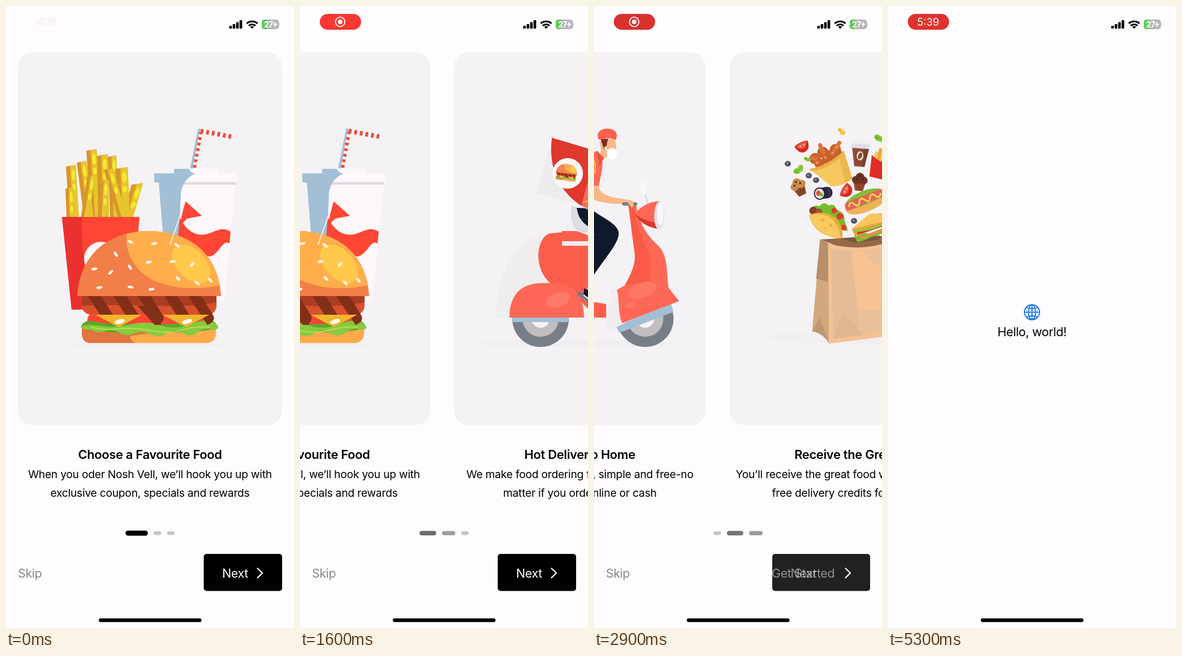
These frames come from a looping animation (509x1100 px, 5400 ms). An HTML page:

```html
<!DOCTYPE html>
<html lang="en">
<head>
<meta charset="utf-8">
<title>Food onboarding</title>
<style>
  html, body { margin: 0; width: 100%; height: 100%; overflow: hidden; background: #fefcff; }
  svg { display: block; width: 100vw; height: 100vh; }
  text { font-family: Inter, "Noto Sans", sans-serif; }
  .title { font-size: 21.8px; font-weight: 600; letter-spacing: -.28px; }
  .body { font-size: 19.2px; letter-spacing: -.23px; }
  .label { font-size: 21.5px; letter-spacing: -.4px; }
  .mid { text-anchor: middle; }
</style>
</head>
<body>
<svg id="stage" viewBox="0 0 509 1100"></svg>
<script>
const W = 509, LOOP = 5400;

// Drawing helpers: filled path, ellipse, stroked line, text
const P = (fill, d, more = '') => `<path fill="${fill}" d="${d}" ${more}/>`;
const E = (fill, x, y, rx, ry = rx, a = 0) =>
  `<ellipse fill="${fill}" rx="${rx}" ry="${ry}" transform="translate(${x} ${y}) rotate(${a})"/>`;
const L = (color, w, d, more = '') => P('none', d, `stroke="${color}" stroke-width="${w}" ${more}`);
const G = (move, body) => `<g transform="${move}">${body}</g>`;
const T = (cls, x, y, s, more = '') => `<text class="${cls}" x="${x}" y="${y}" ${more}>${s}</text>`;

function burger() {
  const bun = 'M126 513C130 440 180 398 253 398S376 440 380 513Z';
  const seeds = [[220,417,30],[262,420,-10],[302,423,40],[194,439,55],[252,453,-10],[219,462,55],
    [294,452,-5],[329,457,-50],[156,465,-8],[185,471,-45],[165,498,-8],[220,497,10],[257,501,-8],
    [304,482,45],[338,490,40],[361,485,50]];
  const stripes = [145, 190, 280].map(x => P('#822f18', `M${x} 513h23l21 33h-23z`)).join('') +
    [233, 322].map(x => P('#822f18', `M${x} 513h23l20 32 q8 12-9 19z`)).join('');
  const cheese = x => P('#f0b62d', `M${x} 546h82l-41 22z`) + E('#fff', x + 43, 558, 9, 4, -15);
  return `<clipPath id="bun"><path d="${bun}"/></clipPath>` +
    P('#e1743f', 'M134 565H371V580Q369 596 352 596H148Q135 595 134 580Z') +
    P('#ffaa4a', 'M219 584Q250 578 371 570V580Q369 596 352 596H229Q221 593 219 584Z') +
    P('#ff4634', 'M150 543H355Q365 546 364 563H144Q142 550 150 543Z') +
    P('#5ba82c', 'M132 568Q136 556 152 557Q190 566 230 561Q290 566 354 556Q370 553 375 570Q330 580 260 576Q180 582 132 568Z') +
    P('#87ca3b', 'M132 566Q150 562 170 566T220 563T275 565T330 562T375 566Q374 575 362 572Q350 568 339 577Q325 588 311 578Q295 568 282 580Q268 588 252 579Q238 573 224 580Q211 586 198 576Q185 570 174 575Q160 580 150 572Q134 574 132 566Z') +
    L('#b5e05a', 2, 'M150 568Q175 574 200 571T255 574T311 573T360 568') +
    P('#d9502c', 'M134 513H372V532Q370 544 358 546H150Q135 544 134 530Z') +
    P('#aa3c21', 'M134 513H372V524Q320 534 250 529Q180 528 134 530Z') + stripes +
    cheese(158) + cheese(277) +
    P('#822f18', 'M232 530l20 0 14 20 9 14-12 0z') +
    P('#f27f48', bun) +
    `<g clip-path="url(#bun)">` +
    P('#ffae4b', 'M214 398C208 430 224 468 262 486C300 502 345 503 390 491V390Z') +
    E('#ffca4b', 327, 456, 41, 25, 46) + '</g>' +
    seeds.map(s => E('#fff6ee', s[0], s[1], 5.5, 2.4, s[2])).join('');
}

// One potato stick from its top edge down to the carton rim
function fry(x, y, w, foot, bottom = 375) {
  const h = bottom - y, m = w * .42, k = (foot - x) / h;
  const drop = (d, ry) => E('#f4ea2b', x + m + w * .28 + k * d, y + d, w * .19, ry, -k * 57);
  return P('#d9952a', `M${x} ${y}l${w}-3L${foot + w} ${bottom}H${foot}Z`) +
    P('#e7c52f', `M${x + m} ${y - 1}l${w - m}-2L${foot + w} ${bottom}H${foot + m}Z`) +
    drop(15, 10) + drop(36, 6);
}

function mealArt() {
  const fries = [[142,256,18,150],[161,265,19,163],[180,267,15,184],[125,277,17,138],[106,284,17,112],
    [105,323,14,107],[222,316,20,204],[193,288,22,197],[173,290,16,198],[144,301,14,132],[166,310,16,162]];
  return E('#f0eef1', 250, 599, 138, 4) +
    fries.map(f => fry(...f)).join('') +
    P('#ff4634', 'M99 373H236L222 537H116Z') +
    P('#ea312f', 'M99 373H135Q133 420 139 460L134 537H116Z') +
    E('#fff8fb', 168, 447, 30, 30) +
    // cup
    P('#fdf7fb', 'M300 318L330 288H375V296H409V311H406L386 522H300Z') +
    P('#dcdcdf', 'M315 311.5H407L406 316H312Z') +
    P('#a2bfd6', 'M262 296H297V288H323Q326 296 335 296Q313 306 309 330L306 410H278L270 312H262Z') +
    P('#ff4634', 'M307 374C318 396 333 407 352 404C368 401 380 388 397 399L395 420C382 412 377 440 360 443C340 440 320 425 304 410Z') +
    P('#ff4634', 'M317 345L346 371 320 376 306 390Z') +
    L('#a2bfd6', 5, 'M328 287L342 217') +
    L('#fff', 6, 'M333 286L345 221') + L('#f04a38', 6, 'M333 286L345 221', 'stroke-dasharray="5 5"') +
    L('#fff', 8, 'M344 221L398 231') + L('#f04a38', 8, 'M344 221L398 231', 'stroke-dasharray="5 5"') +
    `<g id="burger">${burger()}</g>` +
    L('#fff', 1.6, 'M290 422L317 345');
}

function scooterArt() {
  const red = '#ff6856', grey = '#777e88';
  const wheel = x => E(grey, x, 553, 50) + E('#c2bec0', x, 553, 32) + E('#f5f3f5', x, 553, 16);
  return E('#f0eef1', 250, 597, 185, 6) +
    wheel(174) + wheel(381) +
    P('#f4f2f5', 'M119 495H230V551H119ZM325 500H435V528L330 569Z') +
    P('#f0edef', 'M95 551C95 490 120 410 188 403L250 420V551Z') +
    P('#fb5f4b', 'M170 442C171 420 178 407 190 402L215 400 288 424C270 440 264 455 265 480L276 521 312 527V551H273L228 505C190 500 171 475 170 442Z') +
    P('#fb5f4b', 'M212 398H238L288 416H212Z') + P('#f1eeef', 'M212 416H307V424H212Z') +
    P('#a2bfd6', 'M124 550H224L223 559H125Z') +
    P(red, 'M119 551C119 512 138 491 175 490H203C235 493 250 515 251 551Z') + E('#ff7a69', 205, 520, 22, 12, -18) +
    // front body
    P('#a2bfd6', 'M329 566L427 527 431 541 335 578Z') +
    P('#f1edef', 'M332 500C316 522 309 550 314 575L345 561V500Z') +
    P(red, 'M331 502L345 494C358 470 365 455 362 435L351 350H365C368 380 383 405 404 424C421 440 419 470 422 498L441 522 340 561C332 540 336 520 331 502Z') +
    P('#f95b48', 'M351 350H361C362 390 385 425 391 447Q393 470 387 487L345 494C358 470 365 455 362 435Z') +
    E('#ff7866', 376, 503, 26, 13, -20) + E('#ff7866', 354, 529, 9, 5, -15) +
    P('#e03a2c', 'M363 367Q378 358 402 347V394Q372 388 363 367Z') +
    P(red, 'M363 367Q378 348 404 345L404 383Q380 382 363 367Z') +
    E('#e4e1e8', 406, 370, 9, 25, 2) + E('#f8f6fa', 408, 367, 6, 20, 2) +
    L('#b3b3b8', 1, 'M386 350L380 330') + E('#faf7fb', 377.5, 323, 5.5, 13) +
    // rider
    P('#dedde2', 'M230 353C226 382 234 397 247 399L308 404C296 425 278 440 266 487L300 430 310 390 250 360Z') +
    L('#c9c9cf', 1, 'M230 353C226 382 234 397 247 399L308 404C296 425 278 440 266 487') +
    P('#f9b787', 'M261 488L275 492 268 506 256 500Z') +
    P('#10182c', 'M238 357L285 359C305 375 331 384 334 400C337 420 300 455 277 497L262 491C270 455 288 425 291 404C262 394 242 386 238 357Z') +
    L(grey, 8, 'M243 509L280 535', 'stroke-linecap="round"') +
    P('#10182c', 'M251 499Q260 506 269 501Q272 515 284 528Q284 533 277 531L250 511Z') + L('#fff', 2, 'M250 511L277 531') +
    P('#eeebee', 'M195 234L166 331 247 353 255 300Z') +
    P('#df382c', 'M194 233L275 257 247 354C210 330 187 290 194 233Z') +
    E('#fdf9fb', 222, 296, 27) +
    `<use href="#burger" transform="translate(220 294) rotate(8) scale(.148) translate(-253 -497)"/>` +
    P(red, 'M272 258Q285 262 296 256Q309 270 304 292L299 319 275 322Q287 340 282 361Q262 363 246 353Z') +
    P('#a2bfd6', 'M247 353Q262 360 282 360L268 362Q253 361 247 353Z') +
    P('#e44c3c', 'M270 320L299 318 282 330Z') +
    P('#f9b787', 'M279 320L297 317Q301 332 322 338L353 343Q361 347 358 356L350 350Q310 351 292 343Q283 336 279 320Z') +
    L(grey, 6, 'M343 350H352M359 350H364', 'stroke-linecap="round"') +
    P('#f9b787', 'M349 343Q361 343 361 350L358 357 351 349Z') +
    L('#f3d331', 2, 'M274 260C293 264 294 282 292 297M249 347Q268 343 277 331') +
    E('#f2eff2', 297, 235, 10, 18, 12) +
    P('#f9b787', 'M300 240L327 234Q332 250 328 262L309 269 297 276Q306 255 300 240Z') +
    P('#f04f3e', 'M296 256L308 269 300 284Z') +
    P('#7f2f20', 'M302 235H316Q313 240 313 246L308 253Z') +
    L('#fff', 2, 'M309 249L319 261') + E('#fff', 322, 261, 9, 10, 15) +
    P('#fe604e', 'M297 228C299 213 330 213 331 229L329 237C317 231 308 236 298 236Z');
}

function bagArt() {
  const at = (x, y, a, body) => G(`translate(${x} ${y}) rotate(${a})`, body);
  const olive = (x, y) => E('#56535f', x, y, 5.5, 5) + E('#8a8794', x - 1, y - 1, 2);
  const leaf = (x, y, a, s = 1) => at(x, y, a, G(`scale(${s})`, E('#7cc22f', -3, 0, 7, 5, 25) + E('#8ccb3b', 4, 0, 7, 5, -30) + L('#5da321', 1, 'M-7 0L8 0')));
  const tomato = (x, y, a) => at(x, y, a, P('#d92b22', 'M-13-4Q0-9 13-4Q11 12 0 12T-13-4Z') + P('#f0574a', 'M-10-3Q0-6 10-3Q7 5 0 5T-10-3Z') + E('#f7a28c', -3, 0, 2) + E('#f7a28c', 4, 0, 2));
  const muffin = (x, y, a, top, cup) => at(x, y, a, P(cup, 'M-11 1H11L7 17H-7Z') + L('#0003', 1.5, 'M-5 3L-3 16M0 3V16M5 3L3 16') +
    E(top, -6, -2, 8, 7) + E(top, 6, -2, 8, 7) + E(top, 0, -7, 8, 8) + [-6, -1, 5].map((d, i) => E('#4a2016', d, -4 - i % 2 * 5, 1.6)).join(''));
  const sushi = (x, y) => at(x, y, -8, P('#2d2440', 'M-6-10H9Q17-8 17 0T9 10H-6Z') + L('#554a69', 1.5, 'M10-7Q13 0 10 7') +
    E('#2d2440', -6, 0, 10, 11) + E('#f3eff0', -6, 0, 8, 9) + E('#e94a37', -8, -1, 4, 5) + E('#75b83a', -3, 2, 3, 4));

  const bucket = [[172,270,10],[186,259,10],[197,268,13],[208,254,10],[180,279,9],[213,262,8]].map(c => E('#ca602b', ...c)).join('') +
    L('#d9733a', 7, 'M187 260L181 246M207 255L215 242M173 270L165 268', 'stroke-linecap="round"') +
    [[190,268],[203,260],[176,277],[211,250]].map(c => E('#e58a4d', ...c, 3)).join('') +
    P('#f7c75f', 'M162 288Q193 284 223 256L238 305Q222 319 201 319Z') + P('#e9b04b', 'M162 288Q193 284 223 256L224 261Q196 290 165 292Z') +
    P('#ecb650', 'M215 268L223 257 238 305 226 313Z');
  const coffee = at(252, 261, 4, P('#8d4a36', 'M-15-10H15L9 23H-9Z') + P('#7a3e2d', 'M6-10H15L9 23H5Z') + E('#f3e3d5', 0, 4, 6, 8) + E('#8d4a36', 0, 4, 3.5, 6, 20) +
    P('#dedee3', 'M-15-18H15L17-9H-17Z') + P('#efeff2', 'M-13-23H13V-17H-13Z'));
  const carton = at(290, 284, 14, [-17,-12,-6,0,6,12].map((x, i) => P(i % 2 ? '#e9a935' : '#f6c958', `M${x}-${24 + i * 7 % 11}h6L${x + 7} 5h-7z`)).join('') +
    P('#e32b25', 'M-22-16Q0-2 20-13L15 22H-17Z') + P('#bd201e', 'M12-9L20-13 15 22H9Z'));
  const donut = at(318, 311, -12, E('#e8a95b', 0, 3, 20, 16) + E('#783a21', 0, -1, 19, 15) + E('#e8a95b', 0, -1, 6, 4) + E('#f4f2f5', 0, 0, 4, 2.5) +
    [0,1,2,3,4,5,6,7,8].map(i => E(['#f4c44c', '#f08fa0', '#fff'][i % 3], 13 * Math.cos(i * .7), -1 + 10 * Math.sin(i * .7), 2, 1, i * 50)).join(''));
  const hotdog = at(260, 343, -22, E('#dc9440', 0, 4, 38, 17) + E('#82bd33', 0, -2, 36, 14) + E('#edb257', 0, 9, 36, 12) + E('#9acb42', 0, 0, 36, 9) +
    `<rect x="-37" y="-8" width="74" height="15" rx="7" fill="#e0655b"/>` + L('#f8d745', 3, 'M-30 0q5-9 10 0t10 0t10 0t10 0t10 0t10 0', 'stroke-linecap="round"'));
  const taco = P('#77bc2f', 'M165 363Q166 350 180 354Q188 344 196 353Q207 348 210 360Q225 365 224 378L230 398 210 395Z') +
    [[169,362,7,'#85402a'],[179,364,6,'#a25334'],[216,372,6,'#e23a2e'],[223,392,5,'#e23a2e'],[206,362,5,'#e23a2e']].map(c => E(c[3], c[0], c[1], c[2])).join('') +
    P('#eba93c', 'M162 370C175 362 220 360 221 408L218 411C190 408 168 398 162 370Z') + P('#f8cb5f', 'M163 371C180 363 213 369 217 410C190 407 169 396 163 371Z') +
    E('#e9ae44', 185, 378, 3) + E('#e9ae44', 200, 388, 3) + E('#e9ae44', 189, 393, 2);
  const sandwich = P('#77bc2f', 'M241 407Q255 400 270 403T298 389T315 383Q315 395 301 395Q290 406 275 407Q258 416 247 418Z') +
    P('#e9a33d', 'M237 395L268 368 308 365 312 378 244 409Z') + P('#f7c65a', 'M237 394L268 368 308 366 296 381Z') +
    L('#df3328', 5, 'M247 402L312 381') + L('#8ccb3b', 4, 'M242 398Q275 397 314 375') + P('#dc9740', 'M246 411L314 384 313 391 255 412Z');
  const slider = at(361, 281, 12, P('#e0964a', 'M-27 10H27Q26 25 15 25H-15Q-26 24-27 10Z') +
    L('#7fbf35', 7, 'M-27 12q5 5 9 0t9 0t9 0t9 0t9 0t9 0', 'stroke-linecap="round"') +
    L('#7a3a22', 6, 'M-26 7H26', 'stroke-linecap="round"') + P('#f7cf45', 'M-28 0H28L15 7 4 4-8 9Z') +
    L('#df3a2c', 4, 'M-26 0H26', 'stroke-linecap="round"') +
    P('#e39a4c', 'M-29-2C-29-19-16-26 0-26S29-19 29-2Q0 3-29-2Z') + P('#eeb066', 'M-22-10C-18-22 14-28 22-12Q0-6-22-10Z') +
    [-13, -5, 4, 12].map((x, i) => E('#fbe3b4', x, -17 + i % 2 * 5, 2, 1.1, 20)).join(''));

  return E('#f1eff2', 253, 586, 170, 11) +
    P('#96694a', 'M181 413L285 406 314 413 290 428H220Z') + P('#7d553c', 'M215 411L290 407 284 413 245 419Z') +
    sandwich +
    P('#d2a87f', 'M181 413L196 420 197 597Q187 579 167 575Z') + P('#b88f69', 'M181 413L196 420 195 488 174 482Z') +
    P('#bf9671', 'M167 575L181 551 197 597Q187 579 167 575Z') +
    P('#f4c293', 'M195 420Q255 437 314 413L341 579 197 597Z') +
    P('#e4bd98', 'M201 428Q255 442 309 422L331 572 204 588Z') +
    P('#eac09a', 'M236 434Q275 434 309 422L331 572 252 582Z') +
    P('#f9c292', 'M237 434L258 434Q270 458 322 477L329 520Q300 545 247 534Z') +
    P('#dfb78f', 'M204 588L222 540 258 582Z') +
    bucket + coffee + carton + donut + hotdog + taco + slider +
    muffin(143, 319, -25, '#c98a4c', '#8a4a2c') + muffin(251, 310, 5, '#6f3522', '#9a4a30') +
    sushi(186, 331) + sushi(313, 350) +
    tomato(149, 247, -25) + tomato(226, 326, -60) + tomato(349, 327, -40) +
    [[124,279],[161,300],[174,308],[328,257],[340,351],[241,380]].map(o => olive(...o)).join('') +
    leaf(143, 290, -40) + leaf(158, 271, 20, .6) + leaf(286, 234, 15) + leaf(321, 287, -30, .6) + leaf(347, 308, 10, .7) +
    E('#f2b632', 217, 220, 5, 3, 40) + E('#f7c546', 221, 224, 5, 4, -20);
}

const page = (i, title, a, b, art) => G(`translate(${i * W} 0)`,
  `<rect x="21" y="82" width="467" height="659" rx="26" fill="#f4f2f5"/>` + art +
  T('title mid', 254.5, 801, title) + T('body mid', 254.5, 835, a) + T('body mid', 254.5, 867.5, b));

const status = [5, 8, 11.5, 15].map((h, i) => `<rect x="${394.5 + i * 6.1}" y="${40 - h}" width="4.6" height="${h}" rx="1.3"/>`).join('') +
  L('#000', 3.2, 'M425.6 31a13.6 13.6 0 0 1 18.8 0M429 35a8.4 8.4 0 0 1 12 0') + P('#000', 'M435 40.3l-3.4-3.4a4.9 4.9 0 0 1 6.8 0z') +
  `<rect x="452" y="24" width="30.5" height="17" rx="5" fill="#b5b4b8"/>` +
  P('#62c95c', 'M461 24H457Q452 24 452 29V36Q452 41 457 41H461Z') + P('#b5b4b8', 'M483.6 30q2 2.5 0 5z') +
  T('', 456, 37.6, '27', 'font-size="14" font-weight="700" fill="#fff" letter-spacing="-.5"') + P('#fff', 'M477 26.5l-5.5 7h3.6l-1.4 5.5 6-7.4h-3.8z');

const globe = G('translate(254.5 541.5)', L('#1a76e8', 1.9,
  'M-13.4 0a13.4 13.4 0 1 0 26.8 0a13.4 13.4 0 1 0-26.8 0M-13 0H13M0-13V13M-6.3 0a6.3 13.4 0 1 0 12.6 0a6.3 13.4 0 1 0-12.6 0M-10-8.8Q0-3.5 10-8.8M-10 8.8Q0 3.5 10 8.8'));

document.getElementById('stage').innerHTML =
  `<rect width="509" height="1100" fill="#fefcff"/><g id="home"><g id="strip">` +
  page(0, 'Choose a Favourite Food', 'When you oder Nosh Vell, we’ll hook you up with', 'exclusive coupon, specials and rewards', mealArt()) +
  page(1, 'Hot Delivery to Home', 'We make food ordering fasr, simple and free-no', 'matter if you order online or cash', scooterArt()) +
  page(2, 'Receive the Great Food', 'You’ll receive the great food within a hour. And get', 'free delivery credits for every order.', bagArt()) +
  `</g>` + '<rect class="dot"/>'.repeat(3) + T('label', 21, 1010.5, 'Skip', 'fill="#87868a"') +
  `<g id="button"><rect id="plate" y="969" height="65.5" rx="5"/>` +
  T('label', 382, 1010.5, 'Next', 'id="next" fill="#fff"') + T('label', 314, 1010.5, 'Get Started', 'id="begin" fill="#fff"') +
  L('#fff', 2.2, 'M444.5 994.5l8.5 8.3-8.5 8.3', 'stroke-linecap="round" stroke-linejoin="round"') + `</g></g>` +
  `<g id="hello">${globe}${T('label mid', 254.5, 584, 'Hello, world!')}</g>` +
  `<g id="pill"><rect id="pillBg" x="35" y="14" width="73" height="28" rx="14"/>` +
  `<g id="rec">${E('#fff', 71, 28, 4)}<circle cx="71" cy="28" r="8.3" fill="none" stroke="#fff" stroke-width="1.8"/></g>` +
  T('mid', 71, 34.7, '5:39', 'id="clock" fill="#fff" font-size="18.5"') + `</g>` + status +
  `<rect x="164" y="1083" width="181.5" height="6.5" rx="3.2"/>`;

const $ = id => document.getElementById(id);
const dots = document.querySelectorAll('.dot');
const set = (el, attrs) => { for (const k in attrs) el.setAttribute(k, attrs[k]); };

// Quadratic ease in and out between start and start + span
function ease(t, start, span = 300) {
  const p = Math.min(1, Math.max(0, (t - start) / span));
  return p < .5 ? 2 * p * p : 1 - 2 * (1 - p) ** 2;
}

function draw(t) {
  set($('strip'), { transform: `translate(${-W * (ease(t, 1450) + ease(t, 2740))} 0)` });

  const a = ease(t, 1470), b = ease(t, 2766);
  let x = 211.2;
  [1 - a, a - b, b].forEach((on, i) => {
    const w = 13.3 + 26.2 * on, h = 6.5 + 2.5 * on, c = Math.round(197 * (1 - on ** 1.7));
    set(dots[i], { x, y: 932.2 - h / 2, width: w, height: h, rx: h / 2, fill: `rgb(${c},${c},${c})` });
    x += w + 10.4;
  });

  const grow = ease(t, 2750), left = 349.5 - 68 * grow;
  set($('plate'), { x: left, width: 488 - left });
  set($('button'), { opacity: 1 - .135 * Math.sin(Math.PI * grow) });
  set($('next'), { x: 382 - 68 * grow, opacity: 1 - grow });
  set($('begin'), { opacity: grow });

  const done = ease(t, 4450);
  set($('home'), { opacity: 1 - done });
  set($('hello'), { opacity: done });

  // Recording pill: grows in, then breathes
  const show = ease(t, 0, 400), k = .5 + .5 * show, wave = Math.cos((t - 1900) / 2100 * 2 * Math.PI);
  const clock = ease(t, 3150, 250);
  set($('pill'), { opacity: .04 + .96 * show, transform: `translate(71.5 28) scale(${k}) translate(-71.5 -28)` });
  set($('pillBg'), { fill: `rgb(${237 + 18 * wave},${53 + 4 * wave},${48 + 3 * wave})` });
  set($('rec'), { opacity: 1 - clock });
  set($('clock'), { opacity: clock });
}

const t0 = performance.now();
function tick() {
  draw((performance.now() - t0) % LOOP);
  requestAnimationFrame(tick);
}
tick();
</script>
</body>
</html>
```
